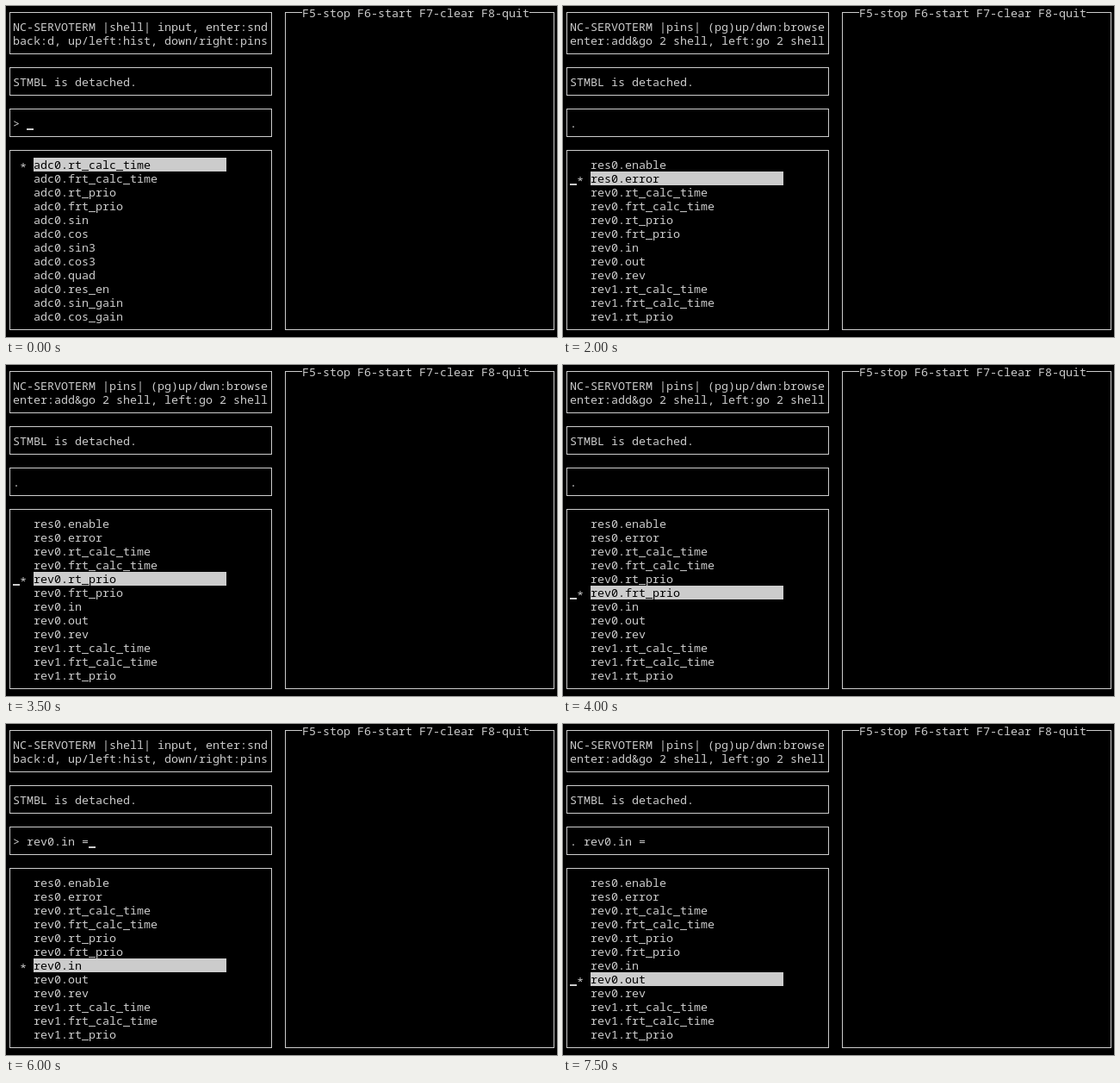
An HTML page with a canvas for the animation above (8 s loop, 640x384 px).

```html
<!DOCTYPE html>
<html lang="en">
<head>
<meta charset="utf-8">
<title>Servo terminal</title>
<style>
html, body { margin: 0; width: 100%; height: 100%; overflow: hidden; background: #000; }
canvas { display: block; }
</style>
</head>
<body>
<canvas width="640" height="384"></canvas>
<script>
const ctx = document.querySelector('canvas').getContext('2d');
const CELL_W = 8, CELL_H = 16, STEP = 500;
const FG = '#cccccc', BG = '#000000';

const withPins = (name, pins) => pins.split(' ').map(pin => `${name}.${pin}`);
const BASE = 'rt_calc_time frt_calc_time rt_prio frt_prio';
const PINS = [
  ...withPins('adc0', BASE + ' sin cos sin3 cos3 quad res_en sin_gain cos_gain sin_offset cos_offset'),
  ...withPins('res0', BASE + ' phase_threshold sin cos quad pos poles enable error'),
  ...withPins('rev0', BASE + ' in out rev'),
  ...withPins('rev1', BASE),
];
const PAGE = 12;

const HELP = {
  shell: ['NC-SERVOTERM |shell| input, enter:snd', 'back:d, up/left:hist, down/right:pins'],
  pins: ['NC-SERVOTERM |pins| (pg)up/dwn:browse', 'enter:add&go 2 shell, left:go 2 shell'],
};

// One entry per step: mode, list page, selected row, typed input
const STEPS = [
  ['shell', 0, 0, ''],
  ['pins', 0, 0, ''],
  ['pins', 0, 1, ''],
  ['pins', 1, 1, ''],
  ...[1, 2, 3, 4, 5, 6].map(row => ['pins', 2, row, '']),
  ...['rev0.in', 'rev0.in ', 'rev0.in =', 'rev0.in = '].map(input => ['shell', 2, 6, input]),
  ['pins', 2, 6, 'rev0.in = '],
  ['pins', 2, 7, 'rev0.in = '],
];

function fill(x, y, w, h, color = FG) {
  ctx.fillStyle = color;
  ctx.fillRect(x, y, w, h);
}

function text(str, col, row, color = FG) {
  ctx.fillStyle = color;
  [...str].forEach((ch, i) => {
    const drop = ch === '*' ? 3 : 0;
    ctx.fillText(ch, (col + i) * CELL_W, row * CELL_H + 13 + drop);
  });
}

// Frame whose lines run through the middle of the corner cells
function box(col, row, endCol, endRow) {
  const x = col * CELL_W + 4, y = row * CELL_H + 7;
  ctx.strokeStyle = FG;
  ctx.strokeRect(x + 0.5, y + 0.5, (endCol - col) * CELL_W, (endRow - row) * CELL_H);
}

function cursor(col, row) {
  fill(col * CELL_W, row * CELL_H + 14, CELL_W, 2);
}

function draw([mode, page, selected, input]) {
  fill(0, 0, 640, 384, BG);
  box(0, 0, 38, 3);
  box(0, 4, 38, 6);
  box(0, 7, 38, 9);
  box(0, 10, 38, 23);
  box(40, 0, 79, 23);

  fill(344, 0, 264, 16, BG);
  text('F5-stop F6-start F7-clear F8-quit', 43, 0);
  HELP[mode].forEach((line, i) => text(line, 1, 1 + i));
  text('STMBL is detached.', 1, 5);
  text((mode === 'shell' ? '> ' : '. ') + input, 1, 8);

  PINS.slice(page * PAGE, (page + 1) * PAGE).forEach((pin, i) => {
    const row = 11 + i, active = i === selected;
    if (active) {
      fill(32, row * CELL_H, 224, CELL_H);
      text('*', 2, row);
    }
    text(pin, 4, row, active ? BG : FG);
  });

  if (mode === 'shell') cursor(3 + input.length, 8);
  else cursor(1, 11 + selected);
}

function frame() {
  ctx.font = '300 13.333px "Noto Sans Mono", "DejaVu Sans Mono", monospace';
  draw(STEPS[Math.floor(performance.now() / STEP) % STEPS.length]);
  requestAnimationFrame(frame);
}
frame();
</script>
</body>
</html>
```
